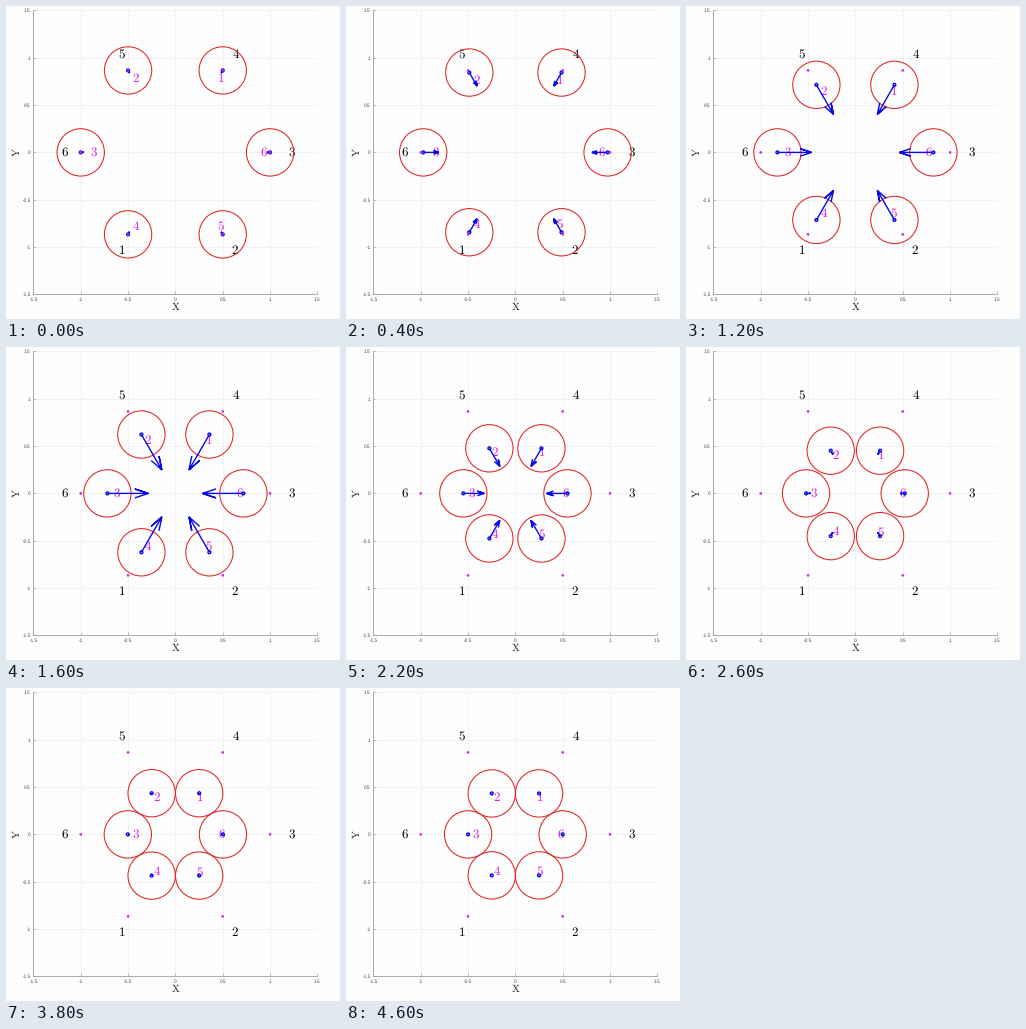
A matplotlib script that plays this animation: 334 px wide and 313 px high, repeating every 4.7 s.

```python
import numpy as np
import matplotlib.pyplot as plt
from matplotlib.animation import FuncAnimation
from matplotlib.patches import Circle

W, H, DPI = 334, 313, 100
STEP_MS, N_FRAMES = 100, 47
LEFT, BOTTOM, SIZE = 27.4, 288.4, 284
UNIT = SIZE / 3
RED, BLUE, MAGENTA = "#e02426", "#0a0ae4", "#d81ce6"
RADIUS = 0.25
ARROW_SCALE = 1.5

plt.rcParams.update({
    "mathtext.fontset": "cm",
    "font.family": "Liberation Sans",
    "text.hinting": "none",
})


def pt(px):
    return px * 72 / DPI


# Inward speed over time (s): ramp up, brake before contact, then creep.
KEY_T = [0, 0.6, 0.8, 1.2, 1.6, 1.8, 2.0, 2.2, 2.4, 2.6, 3.0, 3.8, 4.7]
KEY_V = [0.02, 0.155, 0.2, 0.24, 0.288, 0.305, 0.32, 0.147, 0.055, 0.03, 0.018, 0.005, 0.001]

time = np.arange(N_FRAMES) * STEP_MS / 1000
speed = np.interp(time, KEY_T, KEY_V)
travel = np.cumsum((speed[1:] + speed[:-1]) / 2 * np.diff(time))
dist = 1 - np.concatenate([[0], travel])

angles = np.radians(60 * np.arange(1, 7))
dirs = np.column_stack([np.cos(angles), np.sin(angles)])

fig = plt.figure(figsize=(W / DPI, H / DPI), dpi=DPI, facecolor="#fdfdfd")
ax = fig.add_axes([LEFT / W, 1 - BOTTOM / H, SIZE / W, SIZE / H], facecolor="#fefefe")
ax.set(xlim=(-1.5, 1.5), ylim=(-1.5, 1.5))
ticks = np.arange(-1.5, 1.6, 0.5)
names = [f"{v:g}" for v in ticks]
ax.set_xticks(ticks, names)
ax.set_yticks(ticks, names)
ax.tick_params(direction="in", length=pt(3), width=pt(0.6), pad=pt(2.8),
               color="#999999", labelcolor="#444444", labelsize=pt(4.8))
ax.grid(color="#f0eff0", lw=pt(0.8))
ax.set_axisbelow(True)
for side in ("top", "right"):
    ax.spines[side].set_visible(False)
for side in ("left", "bottom"):
    ax.spines[side].set(color="#999999", linewidth=pt(0.8))

axis_font = dict(fontsize=pt(10.5), color="#222222", ha="center", va="center")
fig.text(169.5 / W, 1 - 301 / H, r"$\mathrm{X}$", **axis_font)
fig.text(10 / W, 1 - 146.5 / H, r"$\mathrm{Y}$", rotation=90, **axis_font)


def label_pos(p):
    return p - np.array([0.7 / UNIT, 0])


def number(n, p, color, z):
    return ax.text(*label_pos(p), rf"$\mathrm{{{n}}}$", fontsize=pt(13), color=color,
                   ha="left", va="center", zorder=z)


def circle(p, r, z, **style):
    return ax.add_patch(Circle(p, r, zorder=z, **style))


discs, arrows, tags, dots = [], [], [], []
for n, d in enumerate(dirs, 1):
    circle(d, 1.3 / UNIT, 8, color=MAGENTA, lw=0)
    number(n, -1.2 * d, "black", 3)
    discs.append(circle(d, RADIUS, 4, fill=False, ec=RED, lw=pt(1.05)))
    tags.append(number(n, 0.9 * d, MAGENTA, 5))
    arrows.append(ax.plot([], [], color=BLUE, lw=pt(1.4), zorder=6, snap=False,
                          solid_joinstyle="bevel", solid_capstyle="butt")[0])
    dots.append(circle(d, 1.4 / UNIT, 7, fill=False, ec=BLUE, lw=pt(1.4)))


def arrow_path(start, vec):
    """Shaft plus an open V head sized in proportion to the shaft."""
    tip = start + vec
    side = 0.11 * np.array([-vec[1], vec[0]])
    back = tip - 0.33 * vec
    return np.array([start, tip, back + side, tip, back - side]).T


def update(i):
    for d, disc, dot, tag, arrow in zip(dirs, discs, dots, tags, arrows):
        p = dist[i] * d
        disc.center = dot.center = p
        tag.set_position(label_pos(0.9 * p))
        arrow.set_data(*arrow_path(p, -ARROW_SCALE * speed[i] * d))
    return [*discs, *tags, *arrows, *dots]


anim = FuncAnimation(fig, update, frames=N_FRAMES, interval=STEP_MS,
                     repeat=True, repeat_delay=0, blit=False)
plt.show()
```
